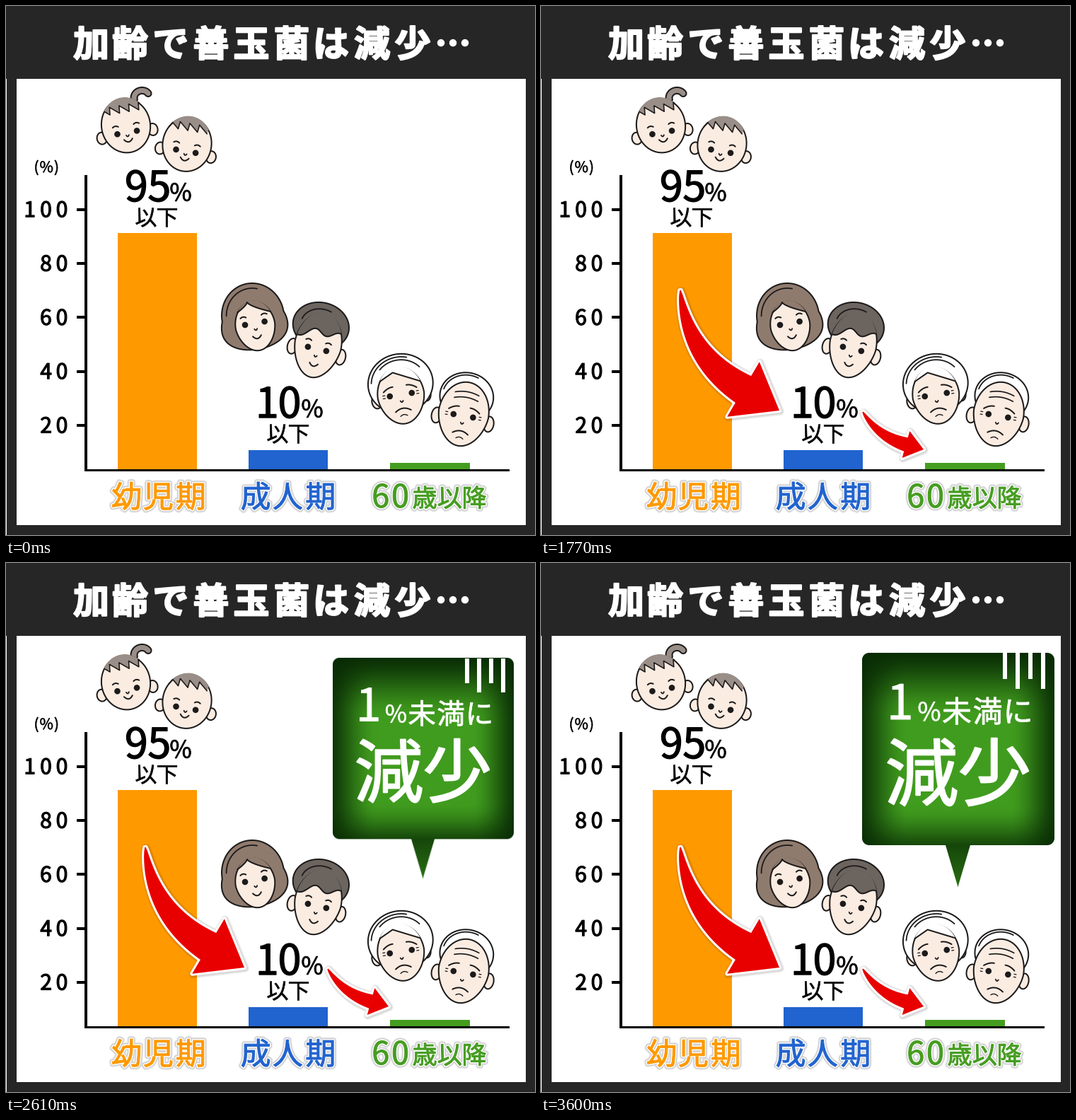
These frames come from a looping animation (748x748 px, 3.63 s). A matplotlib script:

```python
import numpy as np
import matplotlib.pyplot as plt
from matplotlib.animation import FuncAnimation
from matplotlib.patches import PathPatch, Polygon, Rectangle
from matplotlib.path import Path
from matplotlib.textpath import TextPath
from matplotlib.transforms import Affine2D

SIZE, DPI = 748, 100
STEP, FRAMES = 30, 121
PX = 72 / DPI
FONT = "Noto Sans CJK JP"

INK, SKIN = "#1c1a1a", "#fbece2"
ORANGE, BLUE, GREEN, RED = "#ff9900", "#2163cf", "#459d20", "#e80000"
FULL_TURN = np.linspace(0, 2 * np.pi, 73)

fig = plt.figure(figsize=(SIZE / DPI, SIZE / DPI), dpi=DPI, facecolor="#262626")
ax = fig.add_axes([0, 0, 1, 1])
ax.set_axis_off()


def ease(u):
    u = np.clip(u, 0, 1)
    return u * u * (3 - 2 * u)


def rect(x0, y0, x1, y1, color, z=1):
    return ax.add_patch(Rectangle((x0, y0), x1 - x0, y1 - y0, fc=color, lw=0, zorder=z))


def write(s, x, base, size, color="black", pitch=0, bold=0.6, weight="normal", halo=False, z=6):
    """Set characters at an even pitch, the first one centred on x."""
    parts = []
    for k, ch in enumerate(s):
        path = TextPath((0, 0), ch, size=size, prop={"family": FONT, "weight": weight})
        box = path.get_extents()
        move = Affine2D().translate(-(box.x0 + box.x1) / 2, 0).scale(1, -1)
        parts.append(path.transformed(move.translate(x + k * pitch, base)))
    path = Path.make_compound_path(*parts)
    if halo:
        for w in (9, 7.5, 6):
            ax.add_patch(PathPatch(path, fc="none", ec="black", alpha=.07, lw=w * PX,
                                   joinstyle="round", zorder=z))
        ax.add_patch(PathPatch(path, fc="none", ec="white", lw=4 * PX, joinstyle="round", zorder=z))
    return ax.add_patch(PathPatch(path, fc=color, ec=color, lw=bold * PX,
                                  joinstyle="round", zorder=z))


# ---------- chart ----------

def draw_chart():
    rect(0, 103, 1, SIZE, "white")
    rect(15, 103, 735, 734, "white")
    write("加齢で善玉菌は減少…", 119, 71.5, 51, "white", 57, 2.2, "bold")

    rect(158, 321, 270, 655, ORANGE)
    rect(343, 628, 455, 655, BLUE)
    rect(543, 646, 656, 655, GREEN)
    rect(111, 239, 115, 658, "black", 2)
    rect(111, 654.5, 712, 658, "black", 2)
    for value in range(20, 101, 20):
        y = 669.3 - 3.815 * value
        rect(100, y - 2, 112, y + 2, "black", 2)
        label = str(value)
        write(label, 79 - 22.5 * (len(label) - 1), y + 10.5, 30, pitch=22.5, bold=1.2)
    write("(%)", 43.5, 235, 21, pitch=13.7)

    for number, x, pitch, base in (("95", 184, 32, 276), ("10", 370, 31, 582)):
        write(number, x, base, 59, pitch=pitch, bold=1.4)
        write("%", x + 63, base - 0.5, 34, bold=0.8)
        write("以下", x + 14, base + 34, 31, pitch=30)

    write("幼児期", 170, 709, 43, ORANGE, 45.3, 1, halo=True)
    write("成人期", 353, 709, 43, BLUE, 45.5, 1, halo=True)
    write("60", 530, 709, 45, GREEN, 27.5, 1, halo=True)
    write("歳以降", 592, 708, 35, GREEN, 35.5, 1, halo=True)


# ---------- people ----------

def outline(rx, ry, taper=0.0, t=FULL_TURN):
    """Ellipse whose lower half narrows (or flares, if taper < 0)."""
    narrow = 1 - taper * np.maximum(np.sin(t), 0)
    return np.column_stack([rx * np.cos(t) * narrow, ry * np.sin(t)])


def arc(x, y, half, sag):
    """Shallow bow centred on (x, y); positive sag dips in the middle."""
    u = np.linspace(-1, 1, 11)
    return np.column_stack([x + half * u, y + sag * (1 - u * u)])


class Head:
    """Tilted head; everything is drawn in its own upright coordinates."""

    def __init__(self, x, y, rx, ry, tilt):
        self.rx, self.ry = rx, ry
        self.tf = Affine2D().rotate_deg(tilt).translate(x, y)

    def shape(self, pts, fill, edge=INK, x=0, y=0):
        pts = self.tf.transform(pts + np.array([x, y]))
        ax.add_patch(Polygon(pts, fc=fill, ec=edge, lw=2 * PX, joinstyle="round", zorder=3))

    def line(self, pts, w=2.0, color=INK):
        x, y = self.tf.transform(pts).T
        ax.plot(x, y, color=color, lw=w * PX, solid_capstyle="round", zorder=3)

    def ears(self, y, height):
        for side in (-1, 1):
            self.shape(outline(7, height), SKIN, x=side * (self.rx + 2), y=y)

    def skull(self, taper=0.0):
        self.shape(outline(self.rx, self.ry, taper), SKIN)

    def mane(self, dx, dy, rx, ry, color, taper=0.0, strands=()):
        """Hair behind the face, with strands running parallel to its rim."""
        self.shape(outline(rx, ry, taper), color, x=dx, y=dy)
        for k, size in enumerate(strands):
            t = np.radians(np.linspace(190, 290, 20) + 35 * k)
            self.line(outline(rx * size, ry * size, t=t) + [dx, dy], 1.8)

    def fringe(self, hairline, color, w=2.0):
        """Hair between the crown and the curve hairline(u), u from -1 to 1."""
        u = np.linspace(-1, 1, 61)
        crown = -1.04 * np.sqrt(1 - u * u)
        low = np.maximum(crown, hairline(u))
        top, edge = (np.column_stack([u * self.rx, v * self.ry]) for v in (crown, low))
        self.shape(np.vstack([top, edge[::-1]]), color, "none")
        self.line(edge[low > crown], w)

    def features(self, eyes, mouth, mood, gap=14.0, brow=10):
        for side in (-1, 1):
            self.shape(outline(3.3, 3.3), INK, x=side * gap, y=eyes)
            pts = arc(side * (gap + 1), eyes - brow, 4 if mood > 0 else 7, -1.5)
            if mood < 0:
                pts[:, 1] += 0.4 * side * (pts[:, 0] - side * gap)
            self.line(pts)
        self.line(arc(0, (eyes + mouth) / 2 - 2, 2, 2), 1.8)
        self.line(arc(0, mouth - mood * 2, 6 if mood > 0 else 11, mood * 4))

    def age_lines(self, eyes, mouth):
        for side in (-1, 1):
            for dy in (-2, 2):
                self.line(arc(side * 24, eyes + dy, 1.5, 0), 1.3)
        self.line(arc(0, mouth + 9, 5, -2), 1.4)


def draw_people():
    baby_hair, brown, dark = "#9a8e88", "#8f7b6e", "#6b645f"

    girl = Head(169.5, 169, 34.5, 38.5, -10)
    for w, color in ((11, INK), (7, baby_hair)):
        girl.line(outline(11, 10, t=np.radians(np.linspace(175, 335, 20))) + [29, -35], w, color)
    boy = Head(256, 195.5, 34.5, 38.5, 10)
    for baby, part in ((girl, 0.4), (boy, 0.1)):
        baby.ears(12, 8.5)
        baby.skull()
        baby.fringe(lambda u: -0.78 + 0.3 * ((2.5 * u + part) % 1), baby_hair, 1.6)
        baby.features(10, 21.5, 1)

    woman = Head(352.5, 452.5, 28, 35, -10)
    woman.mane(-1, -14, 44, 47, brown, -0.4, (0.85,))
    woman.skull(0.1)
    woman.fringe(lambda u: -1 + 0.5 * np.abs(u + 0.2) ** 0.7, brown)
    woman.features(-4, 16, 1)

    man = Head(441, 480, 33, 46, 13)
    man.mane(-2, -28, 40, 33, dark, strands=(0.72,))
    man.ears(9, 11)
    man.skull(0.12)
    man.fringe(lambda u: -0.42 + 0.09 * np.sin(6 * u) + 0.2 * np.maximum(-u, 0) ** 2, dark)
    man.features(5, 28, 1, 13.3)

    granny = Head(558.5, 551, 33, 40, -9)
    granny.ears(3, 10)
    granny.mane(2, -17, 46, 42, "white", strands=(0.9, 0.8))
    granny.skull(0.1)
    granny.fringe(lambda u: -0.85 + 0.4 * np.abs(u + 0.2), "white")
    granny.features(-1.5, 20, -1, 15.7)
    granny.age_lines(-1.5, 20)

    grandpa = Head(647, 577, 35.5, 45.5, 10)
    grandpa.mane(0, -25, 38, 34, "white", strands=(0.9,))
    grandpa.ears(8, 11)
    grandpa.skull(0.1)
    for y in (-29, -21):
        grandpa.line(arc(0, y, 17, -3), 1.7)
    grandpa.features(2.5, 26, -1)
    grandpa.age_lines(2.5, 26)


# ---------- arrows ----------

class Arrow:
    """Curved arrow uncovered from tail to tip; the shaft swells towards the neck."""

    def __init__(self, tail, neck, tip, bend, start):
        self.tail, self.tip = np.array(tail, float), np.array(tip, float)
        self.start, neck = start, np.array(neck, float)
        head = self.tip - neck
        barb = 0.76 * np.array([-head[1], head[0]])
        t = np.linspace(0, 1, 30)[:, None]
        knee = neck - bend * head
        mid = (1 - t) ** 2 * self.tail + 2 * t * (1 - t) * knee + t**2 * neck
        way = (1 - t) * (knee - self.tail) + t * (neck - knee)
        normal = np.column_stack([-way[:, 1], way[:, 0]]) / np.hypot(*way.T)[:, None]
        half = 0.47 * np.hypot(*barb) * t**0.75 + 0.8
        pts = np.vstack([mid + normal * half, neck + barb, self.tip, neck - barb,
                         (mid - normal * half)[::-1]])
        self.parts = [self.add(pts + 1, ec="black", alpha=.05, lw=w * PX) for w in (12, 10, 8)]
        self.parts += [self.add(pts, ec="white", lw=6 * PX), self.add(pts, fc=RED, lw=0)]

    @staticmethod
    def add(pts, fc="none", **style):
        return ax.add_patch(Polygon(pts, fc=fc, joinstyle="round", zorder=8, **style))

    def update(self, ms):
        u = np.clip((ms - self.start) / 210, 0, 1)
        along = self.tip - self.tail
        n = along / np.hypot(*along)
        side = np.array([-n[1], n[0]]) * 400
        front = self.tail + along * u + (n * 20 if u == 1 else 0)
        back = self.tail - n * 60
        cover = Path([back - side, front - side, front + side, back + side, back - side])
        for p in self.parts:
            p.set_visible(u > 0)
            p.set_clip_path(cover, ax.transData)


# ---------- balloon ----------

BX0, BY0, BX1, BY1, TAIL_Y = 454, 127, 726, 399, 458
CENTER = (589.5, 263)


def balloon_pixels():
    w, h, full = BX1 - BX0, BY1 - BY0, TAIL_Y - BY0
    y, x = np.mgrid[0:full, 0:w] + 0.5
    r = 10
    dx = np.maximum(np.abs(x - w / 2) - w / 2 + r, 0)
    dy = np.maximum(np.abs(y - h / 2) - h / 2 + r, 0)
    body = np.clip(r + 0.5 - np.hypot(dx, dy), 0, 1)
    tail_half = 17.5 * (full - y) / (full - h)
    tail = np.clip(tail_half - np.abs(x - w / 2 + 0.5) + 0.5, 0, 1) * (y >= h - 1)
    glow = (ease((x + 18) / 85) * ease((w - x + 16) / 80)
            * ease((y + 12) / 105) * ease((h - y + 28) / 85))
    glow = np.where(y < h, glow, 0.25 + 0.35 * (y - h) / (full - h))
    dark, light = np.array([8, 42, 4]) / 255, np.array([64, 156, 30]) / 255
    rgb = dark + (light - dark) * glow[..., None]
    return np.dstack([rgb, np.maximum(body, tail)])


class Balloon:
    def __init__(self):
        self.zoom = Affine2D()
        self.image = ax.imshow(balloon_pixels(), extent=(BX0, BX1, TAIL_Y, BY0), aspect="auto",
                               interpolation="bilinear", zorder=7)
        parts = [
            write("1", 508.5, 221, 68, "white", bold=1, z=9),
            write("%", 549, 223, 36, "white", z=9),
            write("未満に", 588, 225, 42, "white", 43.5, 0.8, z=9),
            write("減少", 539, 335, 104, "white", 102, 2, z=9),
        ]
        for k in range(4):
            x = 656 + 18 * k
            parts.append(rect(x - 3, BY0, x + 3, BY0 + 37 + 14 * (k % 2), "white", 9))
        for p in parts + [self.image]:
            p.set_transform(self.zoom + ax.transData)

    def update(self, ms):
        scale = 0.908 + 0.092 * ease((ms - 2550) / 150)
        cx, cy = CENTER
        self.zoom.clear().translate(-cx, -cy).scale(scale).translate(cx, cy)
        # The lettering is white on white until the green fades in.
        self.image.set_alpha(float(np.clip((ms - 1980) / 200, 0, 1)))


draw_chart()
draw_people()
actors = [
    Arrow(tail=(197, 402), neck=(286, 542), tip=(337, 572), bend=1.55, start=540),
    Arrow(tail=(455, 574), neck=(516, 620), tip=(541, 627), bend=1.6, start=1080),
    Balloon(),
]
ax.set_xlim(0, SIZE)
ax.set_ylim(SIZE, 0)


def update(i):
    for actor in actors:
        actor.update(i * STEP)
    return []


anim = FuncAnimation(fig, update, frames=FRAMES, interval=STEP, repeat=True, repeat_delay=0)
plt.show()
```
